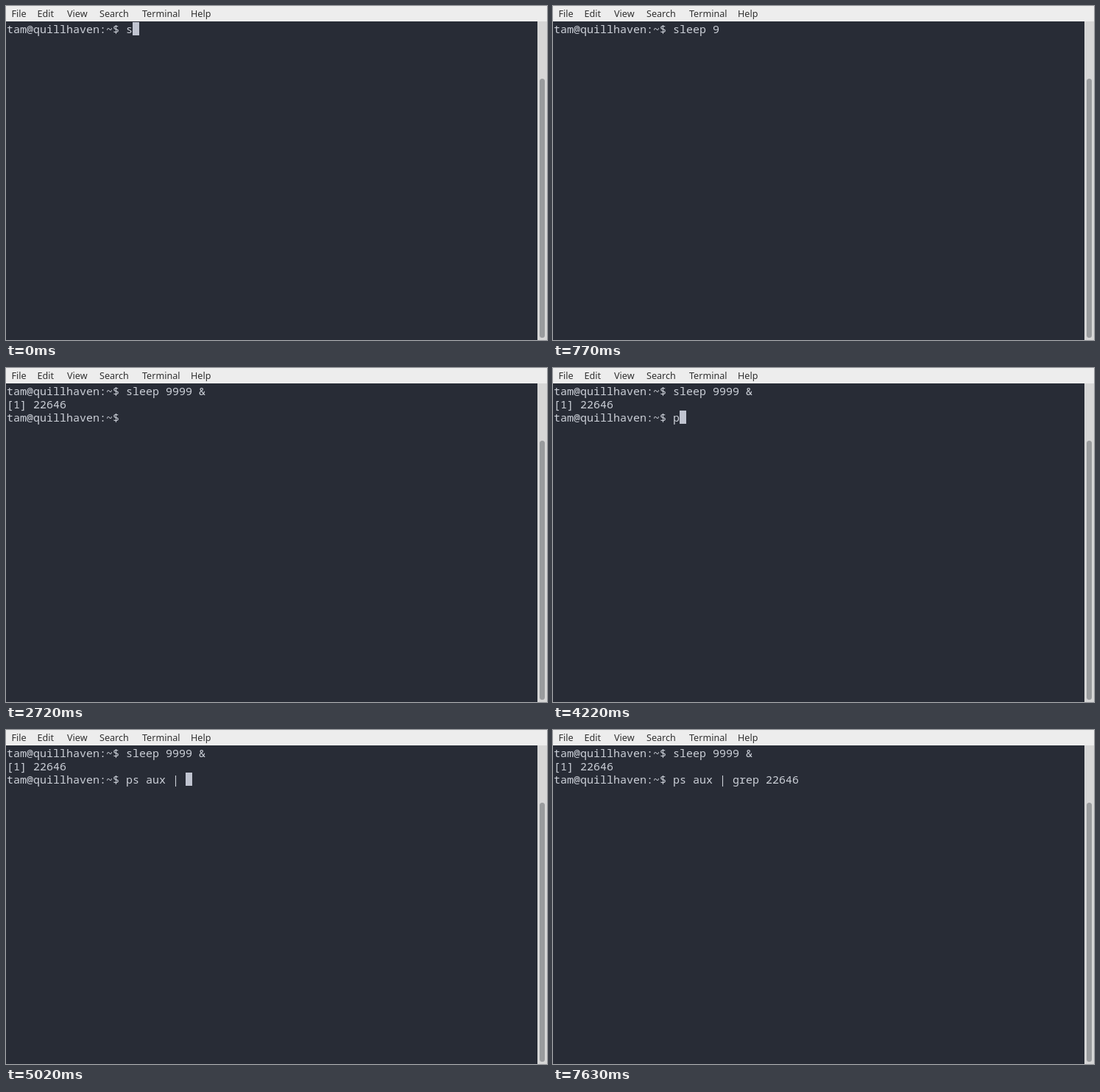
Animation of 735x455 px, one loop 8000 ms. Source, as an HTML page with a canvas:

```html
<!DOCTYPE html>
<html lang="en">
<head>
<meta charset="utf-8">
<title>Terminal</title>
<style>
  html, body { margin: 0; width: 100%; height: 100%; overflow: hidden; background: #282c36; }
  canvas { display: block; }
</style>
</head>
<body>
<canvas id="stage" width="735" height="455"></canvas>
<script>
const ctx = document.getElementById('stage').getContext('2d');
const LOOP = 8000;
const CELL = 9, LINE = 18, LEFT = 1, TOP = 22;
const PROMPT = 'tam@quillhaven:~$ ';
const ENTER = 2720;

const MENU = [['File', 7.5], ['Edit', 42.5], ['View', 83], ['Search', 127], ['Terminal', 185], ['Help', 251]];

// Each entry: time, typed text, cursor visible
const FIRST = [
  [0, 's', true], [100, 'sl', true], [330, 'sle', true], [470, 'slee', true],
  [540, 'sleep', true], [610, 'sleep ', false], [770, 'sleep 9', false],
  [910, 'sleep 99', false], [1050, 'sleep 999', false], [1180, 'sleep 9999', false],
  [2460, 'sleep 9999 &', false]
];
const SECOND = [
  [ENTER, '', false], [4220, 'p', true], [4290, 'ps', true], [4370, 'ps ', true],
  [4450, 'ps a', true], [4590, 'ps au', true], [4690, 'ps aux', true],
  [4810, 'ps aux ', true], [4950, 'ps aux |', true], [5020, 'ps aux | ', true],
  [5650, 'ps aux | g', false], [5850, 'ps aux | gr', false],
  [5940, 'ps aux | gre', false], [6040, 'ps aux | grep', false],
  [7630, 'ps aux | grep 22646', false]
];

function stateAt(keys, t) {
  return keys.filter(k => k[0] <= t).pop();
}

function rect(x, y, w, h, color) {
  ctx.fillStyle = color;
  ctx.fillRect(x, y, w, h);
}

function drawLine(text, row) {
  ctx.fillStyle = '#ccd0d8';
  ctx.fillText(text, LEFT, TOP + row * LINE + 15);
}

function drawCommand(keys, row, t) {
  const [, typed, cursor] = stateAt(keys, t);
  const text = PROMPT + typed;
  drawLine(text, row);
  if (cursor) rect(LEFT + text.length * CELL, TOP + row * LINE, CELL, LINE, '#c0c4d0');
}

function drawWindow() {
  rect(0, 0, 735, 455, '#282c36');
  rect(0, 0, 735, 21, '#ededed');
  rect(722, 21, 13, 434, '#d6d6d6');
  ctx.fillStyle = '#999b9d';
  ctx.beginPath();
  ctx.roundRect(725, 99, 7, 353, 3.5);
  ctx.fill();
  ctx.font = '12.6px "Noto Sans", "Open Sans", sans-serif';
  ctx.fillStyle = '#303030';
  for (const [label, x] of MENU) ctx.fillText(label, x, 15);
}

function draw(t) {
  drawWindow();
  ctx.font = '15px "Noto Sans Mono", "DejaVu Sans Mono", monospace';
  drawCommand(FIRST, 0, t);
  if (t >= ENTER) {
    drawLine('[1] 22646', 1);
    drawCommand(SECOND, 2, t);
  }
}

const start = performance.now();
function tick() {
  draw((performance.now() - start) % LOOP);
  requestAnimationFrame(tick);
}
tick();
</script>
</body>
</html>
```
